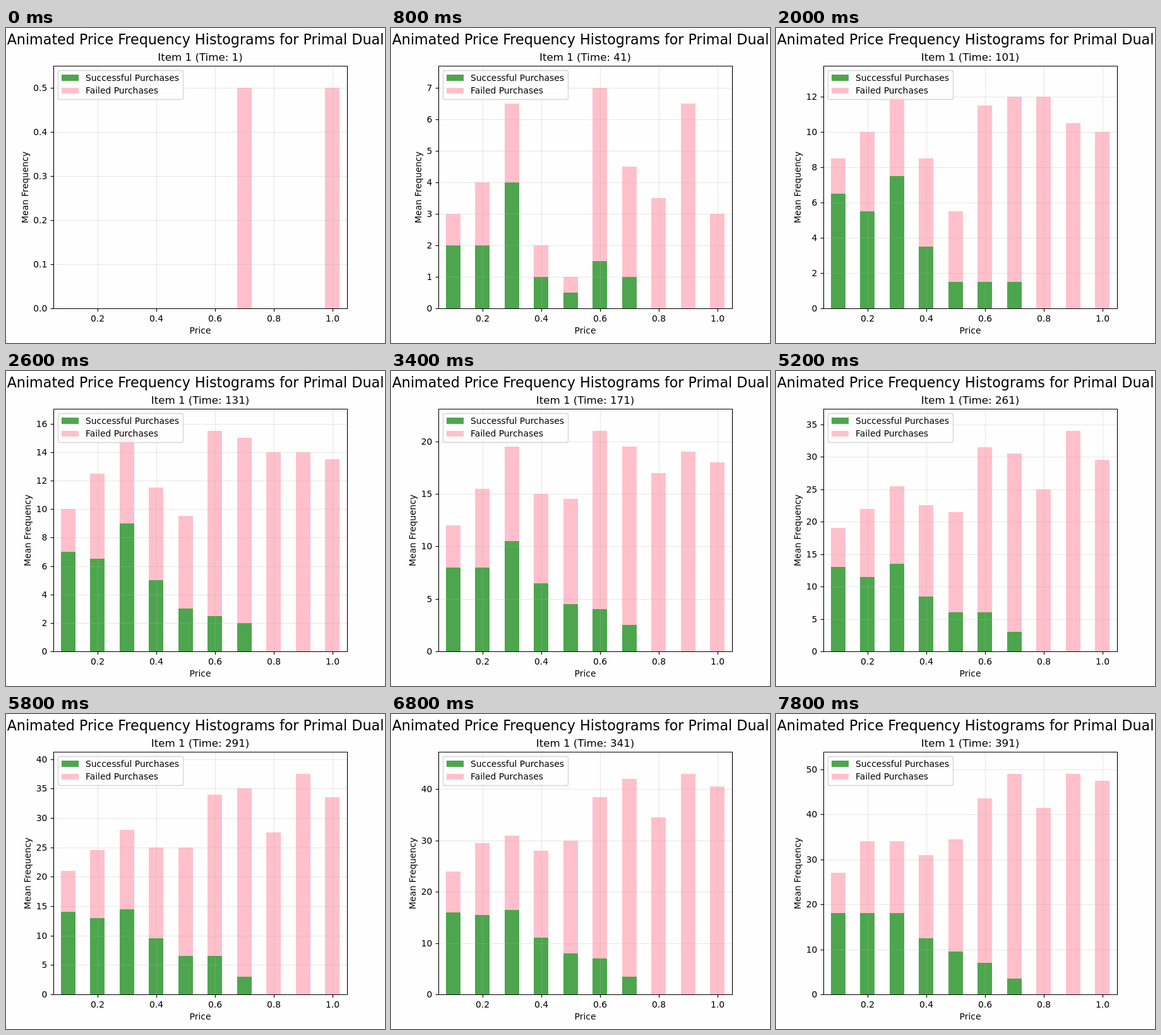
An HTML page with a canvas that plays this animation: 600 px wide and 500 px high, repeating every 8000 ms.

```html
<!DOCTYPE html>
<html lang="en">
<head>
<meta charset="utf-8">
<title>Price frequency histogram</title>
<style>
  html, body { margin: 0; width: 100%; height: 100%; overflow: hidden; background: #fefefe; }
  canvas { display: block; }
</style>
</head>
<body>
<canvas id="stage" width="600" height="500"></canvas>
<script>
const ctx = document.getElementById('stage').getContext('2d');
const STEP_MS = 200, STEPS = 40;
const LEFT = 75, RIGHT = 540, TOP = 60, BOTTOM = 445;
const GREEN = '#4da64d', PINK = '#ffc0cb', PAPER = '#fefefe';
const PT = 100 / 72;

// Known bar heights: all purchases per price, and the successful part of them.
const keys = [
  { time: 1, total: [0, 0, 0, 0, 0, 0, .5, 0, 0, .5], good: [] },
  { time: 41, total: [3, 4, 6.5, 2, 1, 7, 4.5, 3.5, 6.5, 3], good: [2, 2, 4, 1, .5, 1.5, 1] },
  { time: 61, total: [4.5, 6, 9.5, 4, 2.5, 8.5, 7, 6, 7.5, 5.5], good: [3.5, 3, 5.5, 2, .5, 1.5, 1] },
  { time: 101, total: [8.5, 10, 12.5, 8.5, 5.5, 11.5, 12, 12, 10.5, 10], good: [6.5, 5.5, 7.5, 3.5, 1.5, 1.5, 1.5] },
  { time: 171, total: [12, 15.5, 19.5, 15, 14.5, 21, 19.5, 17, 19, 18], good: [8, 8, 10.5, 6.5, 4.5, 4, 2.5] },
  { time: 221, total: [16.5, 18.5, 22.5, 18.5, 17, 28, 25, 21.5, 29, 24.5], good: [12, 10, 12, 7, 5, 5.5, 3] },
  { time: 291, total: [21, 24.5, 28, 25, 25, 34, 35, 27.5, 37.5, 33.5], good: [14, 13, 14.5, 9.5, 6.5, 6.5, 3] },
  { time: 391, total: [27, 34, 34, 31, 34.5, 43.5, 49, 41.5, 49, 47.5], good: [18, 18, 18, 12.5, 9.5, 7, 3.5] }
];

// Heights move in halves, and all totals together always add up to the time.
function heightsAt(time) {
  const next = Math.max(1, keys.findIndex(k => k.time >= time));
  const a = keys[next - 1], b = keys[next];
  const p = (time - a.time) / (b.time - a.time);
  const halves = name => b.total.map((_, i) => {
    const from = a[name][i] || 0, to = b[name][i] || 0;
    return 2 * (from + (to - from) * p);
  });
  const exact = halves('total');
  const total = exact.map(v => Math.floor(v + 1e-6));
  const missing = 2 * time - total.reduce((sum, v) => sum + v, 0);
  const remainder = i => Math.round((exact[i] - total[i]) * 1e4);
  [...total.keys()].sort((i, j) => remainder(j) - remainder(i))
    .slice(0, missing).forEach(i => total[i]++);
  const good = halves('good').map((v, i) => Math.min(Math.round(v), total[i]));
  return { total: total.map(v => v / 2), good: good.map(v => v / 2) };
}

function tickStep(limit) {
  const raw = limit / 9, power = 10 ** Math.floor(Math.log10(raw));
  return power * [1, 2, 2.5, 5, 10].find(s => s * power >= raw - 1e-9);
}

function text(str, x, y, points = 10, align = 'center') {
  ctx.font = `${points * PT}px "DejaVu Sans", sans-serif`;
  ctx.textAlign = align;
  ctx.fillStyle = '#000';
  ctx.fillText(str, x, y);
}

function line(x1, y1, x2, y2, color = '#000') {
  ctx.strokeStyle = color;
  ctx.lineWidth = .8 * PT;
  ctx.beginPath();
  ctx.moveTo(x1, y1);
  ctx.lineTo(x2, y2);
  ctx.stroke();
}

function box(x1, y1, x2, y2, color) {
  const [l, t, r, b] = [x1, y1, x2, y2].map(Math.round);
  ctx.fillStyle = color;
  ctx.fillRect(l, t, r - l, b - t);
}

function legend() {
  ctx.beginPath();
  ctx.roundRect(82.5, 67.5, 198, 46, 2.8);
  ctx.fillStyle = 'rgba(254,254,254,.8)';
  ctx.fill();
  ctx.strokeStyle = 'rgba(204,204,204,.8)';
  ctx.lineWidth = PT;
  ctx.stroke();
  box(88, 74, 115, 84, GREEN);
  box(88, 95, 115, 104, PINK);
  text('Successful Purchases', 126, 84, 10, 'left');
  text('Failed Purchases', 126, 104, 10, 'left');
}

function draw(time) {
  const { total, good } = heightsAt(time);
  const limit = 1.1 * Math.max(...total);
  const toX = price => LEFT + (price - .05) * (RIGHT - LEFT);
  const toY = value => BOTTOM - value / limit * (BOTTOM - TOP);
  const snap = v => Math.round(v) + .5;
  const gridColor = 'rgba(176,176,176,.3)';

  box(0, 0, 600, 500, PAPER);
  total.forEach((sum, i) => {
    const x = toX((i + 1) / 10), half = .025 * (RIGHT - LEFT);
    box(x - half, toY(sum), x + half, toY(good[i]), PINK);
    box(x - half, toY(good[i]), x + half, BOTTOM, GREEN);
  });

  for (const price of [.2, .4, .6, .8, 1]) {
    const x = snap(toX(price));
    line(x, TOP, x, BOTTOM, gridColor);
    line(x, BOTTOM + .5, x, BOTTOM + 5.4);
    text(price.toFixed(1), x - .5, 466);
  }

  const step = tickStep(limit);
  const digits = [0, 1, 2].find(d => Math.abs(step - step.toFixed(d)) < 1e-9);
  let labelWidth = 0;
  for (let n = 0; n * step <= limit; n++) {
    const y = snap(toY(n * step)), label = (n * step).toFixed(digits);
    line(LEFT, y, RIGHT, y, gridColor);
    line(LEFT + .5, y, LEFT - 4.4, y);
    text(label, 65.3, y + 4.5, 10, 'right');
    labelWidth = Math.max(labelWidth, ctx.measureText(label).width);
  }

  line(LEFT, TOP + .5, RIGHT + 1, TOP + .5);
  line(LEFT, BOTTOM + .5, RIGHT + 1, BOTTOM + .5);
  line(LEFT + .5, TOP, LEFT + .5, BOTTOM + 1);
  line(RIGHT + .5, TOP, RIGHT + .5, BOTTOM + 1);

  text('Price', 307.5, 485);
  ctx.save();
  ctx.translate(Math.round(56.7 - labelWidth), 253);
  ctx.rotate(-Math.PI / 2);
  text('Mean Frequency', 0, 0);
  ctx.restore();

  legend();
  text(`Item 1 (Time: ${time})`, 307.5, 52, 12);
  text('Animated Price Frequency Histograms for Primal Dual', 300, 26, 16);
}

function frame() {
  const step = Math.floor(performance.now() / STEP_MS) % STEPS;
  draw(1 + 10 * step);
  requestAnimationFrame(frame);
}
frame();
</script>
</body>
</html>
```
